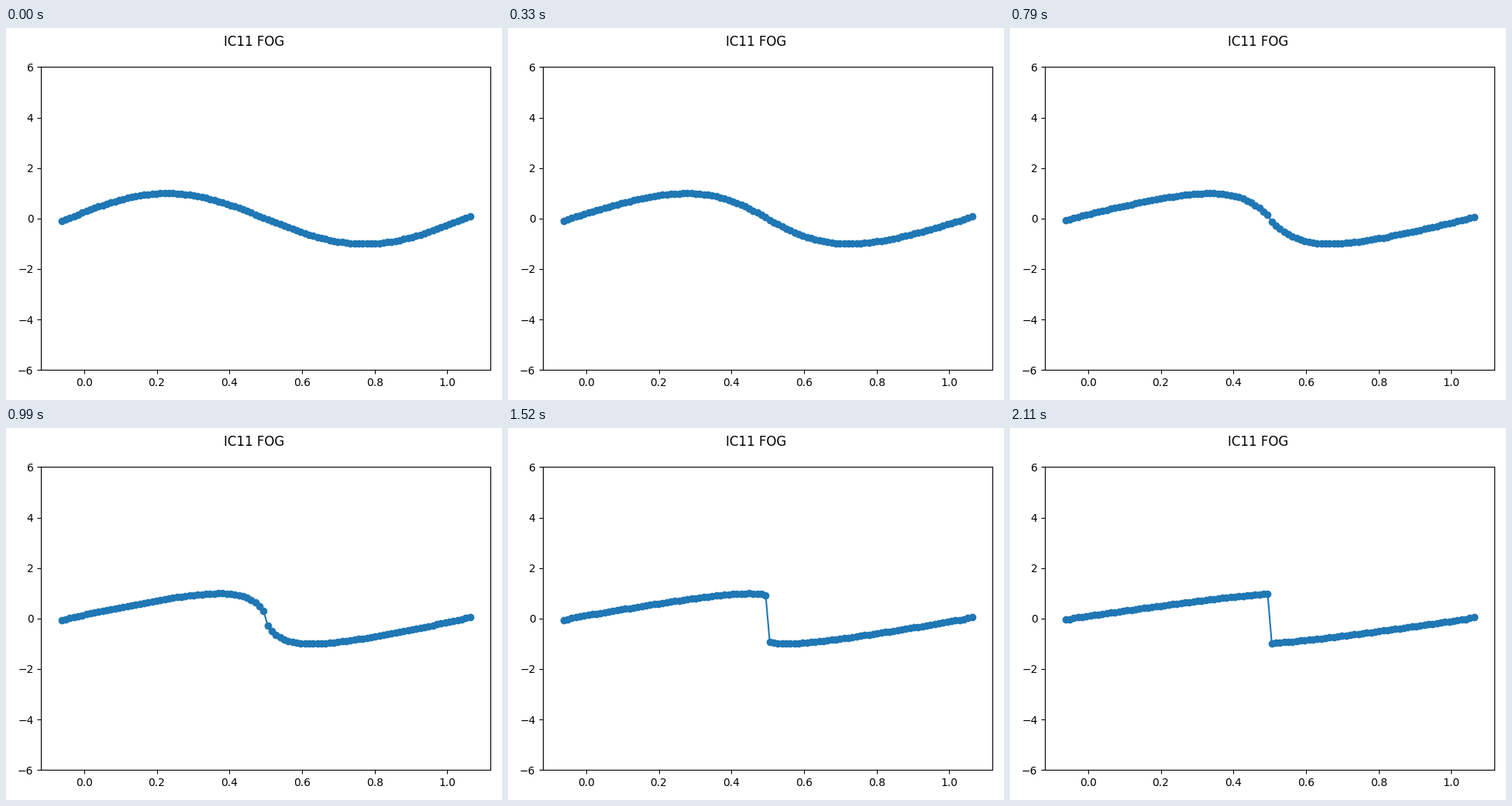
Animation, 640 px wide and 480 px high, one loop 2180 ms. Source, as a matplotlib script:

```python
import numpy as np
import matplotlib.pyplot as plt
from matplotlib.animation import FuncAnimation

LOOP_MS = 2180
FRAMES = 33
CELLS = 96       # periodic interior cells
GHOST = 2        # ghost cells on each side
DX = 1 / 88
COURANT = 0.87   # dt / dx
HEIGHT = 480


def godunov_flux(left, right):
    """Exact Riemann flux of the inviscid Burgers equation."""
    return np.maximum(np.maximum(left, 0) ** 2, np.minimum(right, 0) ** 2) / 2


def step(u):
    flux = godunov_flux(u, np.roll(u, -1))
    return u - COURANT * (flux - np.roll(flux, 1))


def solve():
    u = np.sin(2 * np.pi * (np.arange(CELLS) + 0.5) / CELLS)
    states = [u]
    for _ in range(FRAMES - 1):
        states.append(step(states[-1]))
    return [np.pad(s, GHOST, mode="wrap") for s in states]


states = solve()
count = CELLS + 2 * GHOST
x = 0.5 + (np.arange(count) - (count - 1) / 2) * DX

fig, ax = plt.subplots(figsize=(6.4, HEIGHT / 100), dpi=100)
fig.suptitle("IC11 FOG", y=0.98 + 1 / HEIGHT)
line, = ax.plot(x, states[0], "o-", color="#1f77b4")
ax.set_ylim(-6, 6)
fig.tight_layout()
fig.subplots_adjust(top=1 - 50.4 / HEIGHT)


def update(i):
    line.set_ydata(states[i])
    return line,


anim = FuncAnimation(fig, update, frames=FRAMES, interval=LOOP_MS / FRAMES,
                     repeat=True, repeat_delay=0)
plt.show()
```
